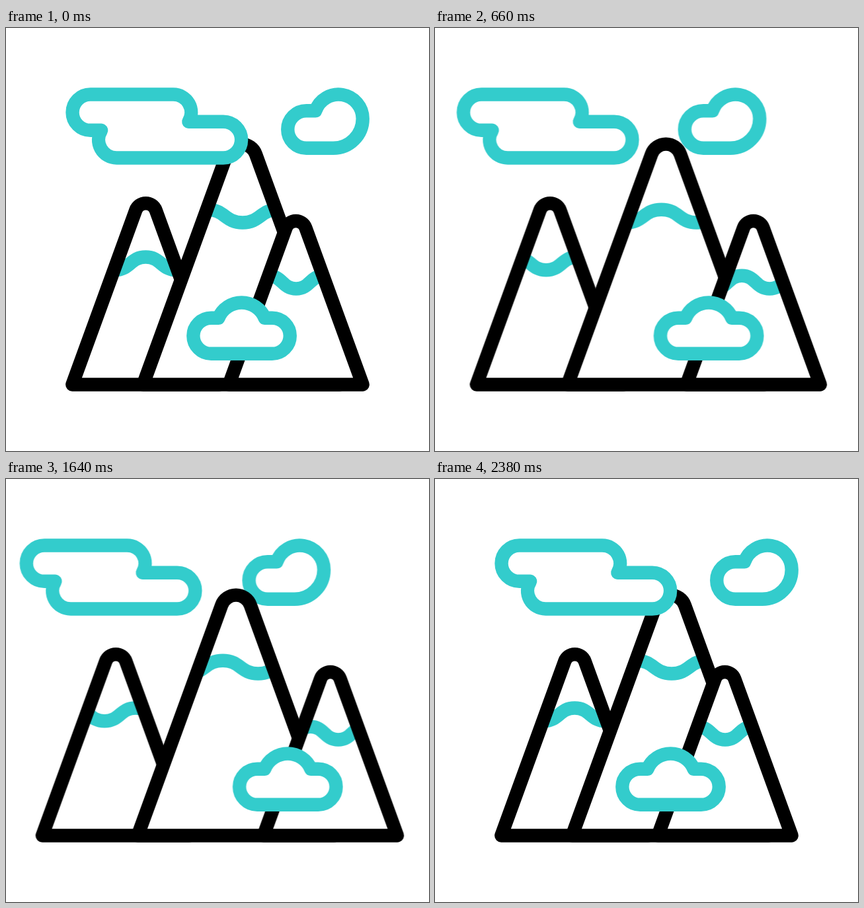
Animation, 640 px wide and 640 px high, one loop 2.4 s. Source, as an HTML page:

```html
<!DOCTYPE html>
<html lang="en">
<head>
<meta charset="utf-8">
<title>Mountains</title>
<style>
  html, body { margin: 0; width: 100%; height: 100%; overflow: hidden; background: #fff; }
  svg { display: block; width: 100%; height: 100%; }
  path { stroke-width: 20.4; stroke-linejoin: round; }
  .rock { fill: none; stroke: #000; }
  .back { fill: #fff; stroke: none; }
  .snow { fill: none; stroke: #3cc; }
  .cloud { fill: #fff; stroke: #3cc; }

  /* --d is the sideways travel at the far end of the swing */
  .drift { animation: drift 2400ms infinite; }
  @keyframes drift {
    0% { transform: translateX(0); animation-timing-function: cubic-bezier(.79, 0, .21, 1); }
    50% { transform: translateX(var(--d)); animation-timing-function: cubic-bezier(.79, 0, .21, 1); }
    99.167%, 100% { transform: translateX(0); }
  }
</style>
</head>
<body>
<svg viewBox="0 0 640 640">
  <defs>
    <path id="left" d="M100.3 539.5L196.2 276A16.27 16.27 0 0 1 226.8 276L322.7 539.5Z"/>
    <path id="mid" d="M207.4 539.5L334.3 190.9A23.2 23.2 0 0 1 377.9 190.9L504.8 539.5Z"/>
    <path id="right" d="M337.3 539.5L423.6 302.4A15.85 15.85 0 0 1 453.4 302.4L539.7 539.5Z"/>
    <clipPath id="inLeft"><use href="#left"/></clipPath>
    <clipPath id="inMid"><use href="#mid"/></clipPath>
    <clipPath id="inRight"><use href="#right"/></clipPath>
  </defs>

  <path class="cloud drift" style="--d:-69px" d="M454.5 125.3H468.3A36.7 36.7 0 0 1 539.7 137.2A44.6 44.6 0 0 1 495.1 181.8H454.5a28.25 28.25 0 0 1 0-56.5z"/>

  <g class="drift" style="--d:-53.4px">
    <use class="back" href="#left"/>
    <g clip-path="url(#inLeft)">
      <path class="snow drift" style="--d:-75.2px" d="M117.3 346.5c23.5 0 23.5 19.8 47 19.8s23.5-19.8 47-19.8s23.5 19.8 47 19.8s23.5-19.8 47-19.8s23.5 19.8 47 19.8s23.5-19.8 47-19.8"/>
    </g>
    <use class="rock" href="#left"/>
  </g>

  <g class="drift" style="--d:-9.6px">
    <use class="back" href="#mid"/>
    <g clip-path="url(#inMid)">
      <path class="snow drift" style="--d:-88.8px" d="M251 294.5c26.75 0 26.75-19.8 53.5-19.8s26.75 19.8 53.5 19.8s26.75-19.8 53.5-19.8s26.75 19.8 53.5 19.8s26.75-19.8 53.5-19.8s26.75 19.8 53.5 19.8"/>
    </g>
    <use class="rock" href="#mid"/>
  </g>

  <g class="drift" style="--d:61.5px">
    <use class="back" href="#right"/>
    <g clip-path="url(#inRight)">
      <path class="snow drift" style="--d:-85.5px" d="M355 394.5c21 0 21-19.8 42-19.8s21 19.8 42 19.8s21-19.8 42-19.8s21 19.8 42 19.8s21-19.8 42-19.8s21 19.8 42 19.8"/>
    </g>
    <use class="rock" href="#right"/>
  </g>

  <path class="cloud drift" style="--d:-82px" d="M127.7 100.5H253A27.2 27.2 0 0 1 276.3 141.7H328.7a27.4 27.4 0 0 1 0 54.8H167.5A27.3 27.3 0 0 1 144.2 154.8H127.7a27.15 27.15 0 0 1 0-54.3z"/>
  <path class="cloud drift" style="--d:82px" d="M310.4 438.7H321.5A38 38 0 0 1 391.5 438.7H402.7a27.05 27.05 0 0 1 0 54.1H310.4a27.05 27.05 0 0 1 0-54.1z"/>
</svg>
</body>
</html>
```
